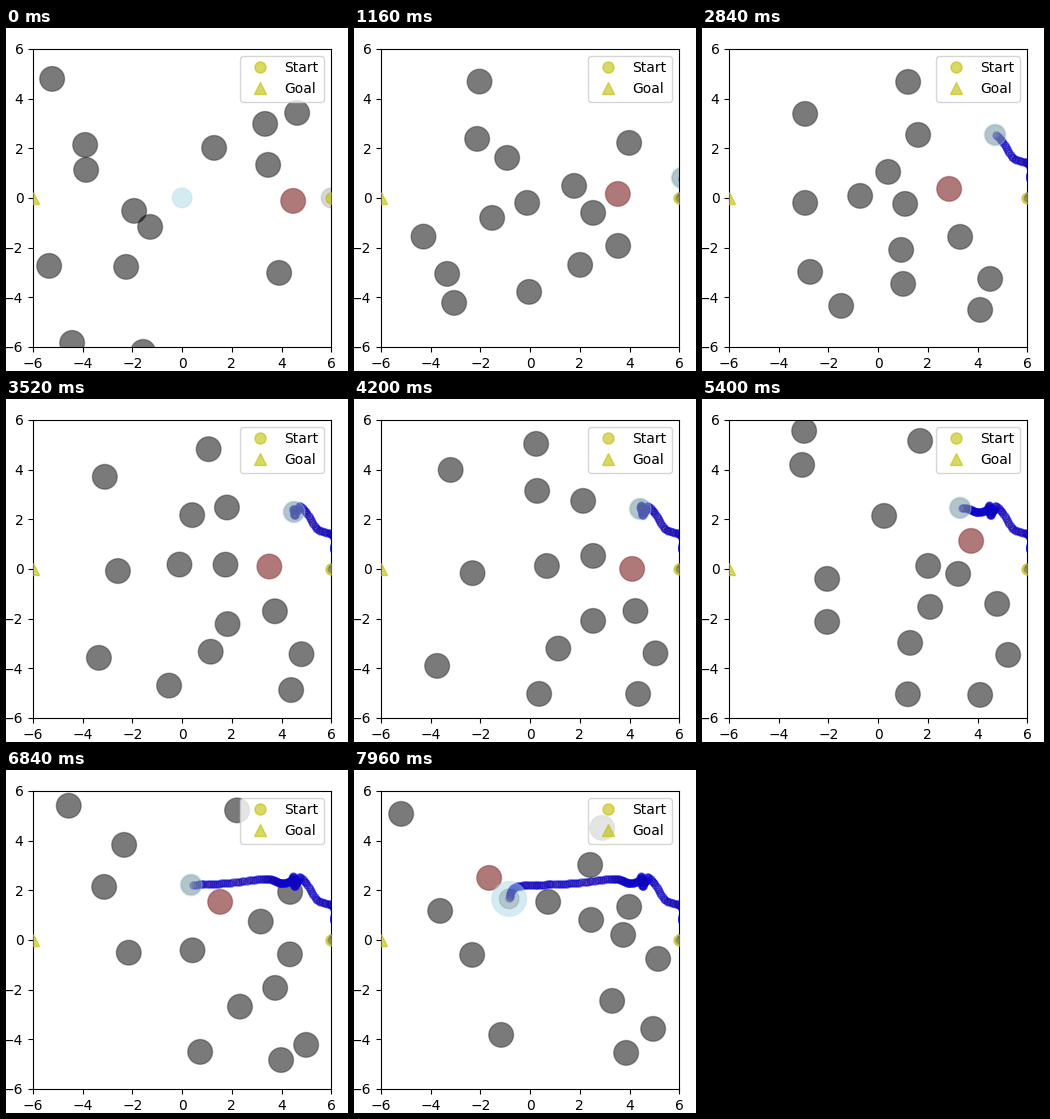
Recreate the animation shown at these times as a matplotlib script. Size 342 px wide and 343 px high, loop 8000 ms.

```python
import numpy as np
import matplotlib.pyplot as plt
from matplotlib.animation import FuncAnimation
from matplotlib.colors import to_rgb
from matplotlib.patches import Circle

W, H, DPI = 342, 343, 100
FRAMES, STEP = 200, 40
LEFT, BOTTOM, SIDE, LIMIT = 27.1, 24.05, 298.1, 6
SCALE = SIDE / (2 * LIMIT)
CENTER = 176 + 170j
KEYS = np.array([0, 1160, 2840, 4200, 5400, 6840, 7960])
clock = np.arange(FRAMES) * float(STEP)


def glide(times, points):
    """Smooth curve through a few timed points x+yj, one value per frame."""
    times, points = np.array(times, float), np.array(points)
    slope = np.gradient(points, times)
    i = np.clip(np.searchsorted(times, clock, side="right") - 1, 0, len(times) - 2)
    h = times[i + 1] - times[i]
    u = (clock - times[i]) / h
    ease = u * u * (3 - 2 * u)
    return (points[i] * (1 - ease) + points[i + 1] * ease
            + h * u * (1 - u) * (slope[i] * (1 - u) - slope[i + 1] * u))


def walk(keys, *points):
    """Walker passing its turning points at the key times named by digits."""
    return glide(KEYS[[int(k) for k in keys]], points)


crowd = [
    walk("02346", 46+51j, 206+54j, 182+45j, 102+32j, 47+44j),
    walk("012456", 79+117j, 123+111j, 103+86j, 100+66j, 118+75j, 194+132j),
    walk("0123456", 80+142j, 153+130j, 186+144j, 183+92j, 182+117j, 98+117j, 86+141j),
    walk("012346", 291+85j, 275+115j, 216+107j, 229+102j, 218+42j, 248+58j),
    walk("0123456", 208+120j, 220+158j, 203+176j, 239+157j, 256+175j, 284+122j, 236+95j),
    walk("01246", 128+183j, 138+190j, 158+168j, 226+167j, 275+137j),
    walk("0123456", 144+199j, 173+175j, 199+222j, 239+222j, 228+208j, 269+218j, 304+189j),
    walk("0246", 43+238j, 103+175j, 125+180j, 118+185j),
    walk("012346", 120+239j, 93+246j, 108+244j, 83+267j, 125+223j, 237+150j),
    walk("01246", 259+96j, 239+185j, 258+209j, 295+205j, 269+165j),
    walk("012356", 66+315j, 100+275j, 139+278j, 185+295j, 194+282j, 147+265j),
    walk("01246", 137+324j, 175+264j, 201+256j, 208+244j, 258+231j),
    walk("012456", 262+137j, 264+218j, 288+251j, 306+256j, 300+275j, 299+259j),
    walk("01246", 273+245j, 226+237j, 278+282j, 278+296j, 272+283j),
]
chaser = walk("023456", 287+173j, 247+161j, 278+170j, 269+142j, 214+132j, 135+108j)

route = {0: 325+170j, 120: 328+166j, 1160: 328+150j, 1880: 325+135j,
         2240: 311+130j, 2640: 299+112j, 2840: 293+107j, 3100: 289+112j,
         4200: 286+110j, 4500: 279+113j, 5400: 258+109j, 6100: 222+113j,
         6840: 185+115j, 7500: 159+118j, 7960: 155+129j}
pause = np.clip((clock - KEYS[2]) / (KEYS[3] - KEYS[2]), 0, 1)
robot_path = glide(list(route), list(route.values()))
robot_path += (1 + 3j) * np.sin(6 * np.pi * pause)
halo_size = (11 + 6.5 * np.clip((clock - 7500) / 460, 0, 1)) / SCALE


def to_data(p):
    """Stage pixels x+yj to axes units."""
    p = (p - CENTER) / SCALE
    return p.real, -p.imag


fig = plt.figure(figsize=(W / DPI, H / DPI), dpi=DPI, facecolor="white")
ax = fig.add_axes([LEFT / W, BOTTOM / H, SIDE / W, SIDE / H])
ax.set(xlim=(-LIMIT, LIMIT), ylim=(-LIMIT, LIMIT))
ax.set_xticks(range(-LIMIT, LIMIT + 1, 2))
ax.set_yticks(range(-LIMIT, LIMIT + 1, 2))


def disc(radius, color, alpha, z):
    rgb = to_rgb(color)
    return ax.add_patch(Circle((0, 0), radius, fc=(*rgb, alpha),
                               ec=(*rgb, 0.6 * alpha), lw=1, zorder=z))


ax.plot([LIMIT], [0], "yo", ms=8, alpha=0.6, label="Start", zorder=3)
ax.plot([-LIMIT], [0], "y^", ms=8, alpha=0.6, label="Goal", zorder=3)
trail, = ax.plot([], [], "o", ms=5, mew=1, mfc=(0.2, 0.05, 0.45, 0.3),
                 mec=(0, 0, 0.9, 0.5), zorder=2.2)
halo = disc(0.4, "lightblue", 0.5, 2.4)
robot = disc(0.4, "black", 0.16, 2.5)
balls = [disc(0.5, "black", 0.52, 1) for _ in crowd]
hunter = disc(0.5, (0.42, 0.01, 0.01), 0.53, 1)
ax.legend(loc="upper right")


def update(i):
    for ball, path in zip(balls + [hunter, robot], crowd + [chaser, robot_path]):
        ball.center = to_data(path[i])
    halo.center = robot.center if i else (0, 0)
    halo.set_radius(halo_size[i] if i else 0.4)
    trail.set_data(*to_data(robot_path[:i]))
    return [*balls, hunter, robot, halo, trail]


anim = FuncAnimation(fig, update, frames=FRAMES, interval=STEP,
                     init_func=lambda: update(0), repeat=True, repeat_delay=0)
plt.show()
```
